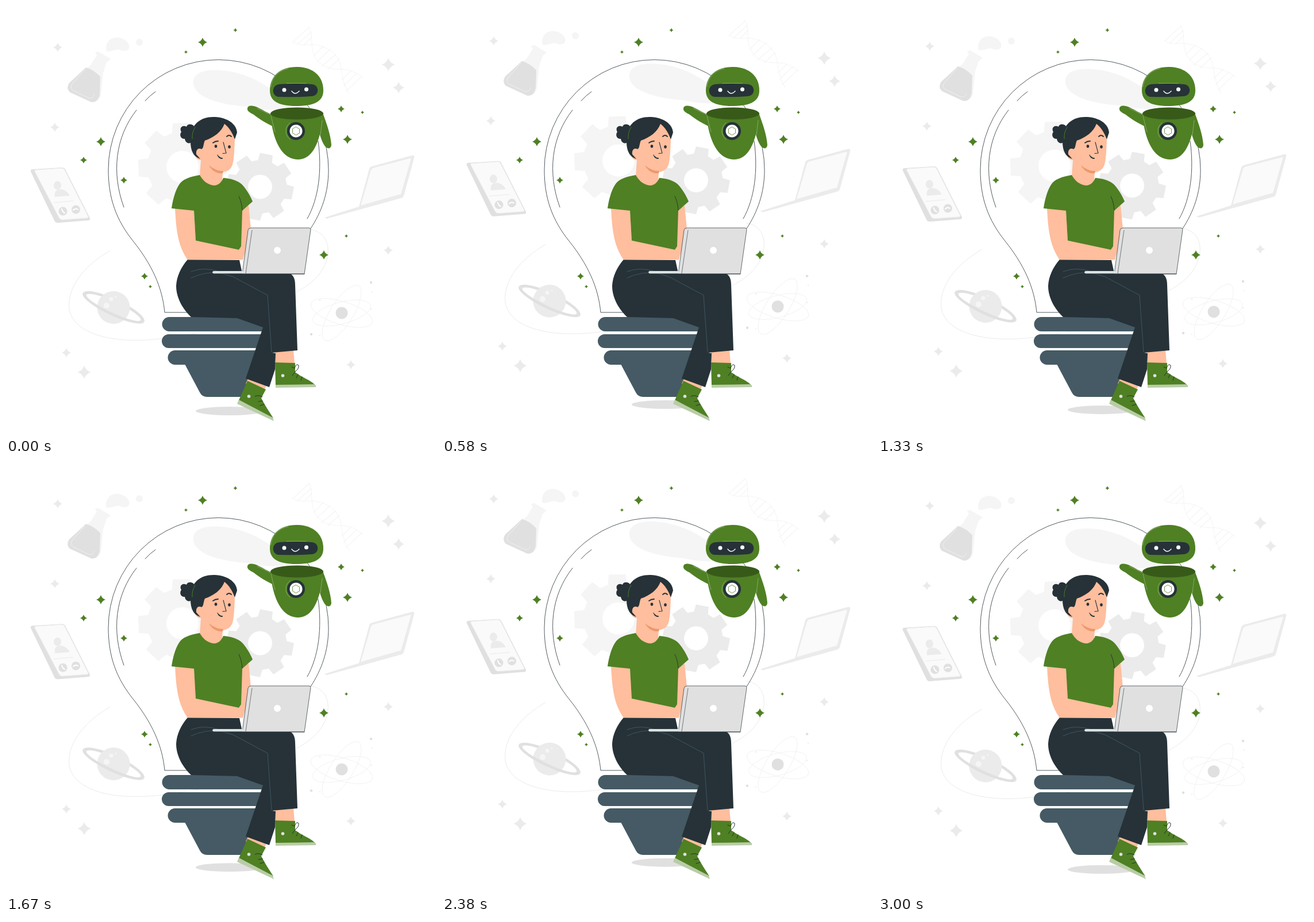
An HTML page for the animation above (3.04 s loop, 748 px wide and 748 px high).

```html
<!DOCTYPE html>
<html lang="en">
<head>
<meta charset="utf-8">
<title>Idea lamp</title>
<style>
html, body { margin: 0; width: 100%; height: 100%; overflow: hidden; background: #fff; }
svg { display: block; width: 100vw; height: 100vh; }
.line { fill: none; stroke-linecap: round; stroke-linejoin: round; }
</style>
</head>
<body>
<svg viewBox="0 0 748 748">
  <g id="drift">
    <g class="line" stroke="#ebebeb">
      <path d="M180 426C135 452 106 490 110 527C117 570 185 590 275 578Q305 573 335 569"/>
      <path d="M529 389C550 391 562 408 560 430C557 460 535 482 506 497"/>
    </g>
    <path fill="#f5f5f5" d="M326 130C329 112 355 109 385 113C425 119 460 140 485 165C500 185 450 183 420 175C385 173 322 162 326 130Z"/>
    <g id="cogs"></g>

    <!-- flask -->
    <path fill="#f5f5f5" d="M155 81L160 79L182 92L175 98L169 116L165 156Q160 169 148 166L111 150Q104 142 110 133L147 103L158 86ZM174 77C173 60 185 53 197 55C208 57 217 66 214 74C210 80 203 78 198 76C190 74 178 83 174 77Z"/>
    <circle cx="232" cy="63" r="6" fill="#f5f5f5"/>
    <path fill="#e0e0e0" d="M139 107Q153 111 164 123L163 154Q159 169 148 167L111 150Q104 143 110 134Z"/>
    <path class="line" stroke="#f0f0f0" d="M137 111L115 136Q111 142 117 147L144 160Q151 162 154 154"/>

    <!-- helix -->
    <g class="line" stroke="#ebebeb" stroke-width=".8">
      <path stroke="#f2f2f2" d="M498 62C513 72 525 65 540 68C565 72 579 88 583 107C585 125 589 141 597 153M527 36C535 50 529 66 535 82C541 100 557 111 583 110C600 110 612 118 621 125"/>
      <path d="M500 62L527 37M508 66L531 45M519 67L532 54M536 86L552 70M541 97L564 75M549 105L574 84M560 110L580 92M584 128L600 113M587 139L610 117M592 148L618 123"/>
    </g>

    <!-- phone -->
    <path fill="#e0e0e0" d="M43 288Q42 284 47 284L97 281Q101 281 103 284L146 369Q147 373 142 373L92 377Q86 378 84 373Z"/>
    <path fill="#fafafa" stroke="#ebebeb" d="M52 285L97 282Q100 282 102 285L143 366Q144 369 140 369L98 372Q94 372 92 368L50 288Q49 285 52 285Z"/>
    <g fill="#ebebeb">
      <ellipse cx="89.500" cy="312" rx="6.500" ry="7.500"/>
      <path d="M85 332C83 321 90 318 98 319Q106 321 111 330Z"/>
    </g>
    <g fill="#e0e0e0"><circle cx="99" cy="357" r="7.500"/><circle cx="121.500" cy="354" r="7.500"/></g>
    <path class="line" stroke="#ebebeb" d="M83 342L117 339"/>
    <path class="line" stroke="#fff" stroke-width="2" d="M97 353Q98 358 102 360M117 355Q121 351 125 354"/>

    <!-- notebook -->
    <path fill="#ebebeb" d="M554 368L614 349L632 283Q633 280 636 279L706 260Q711 259 710 264L692 330Q691 333 688 334L558 370Z"/>
    <path fill="#fafafa" d="M638 282L703 265Q705 265 704 268L687 327L617 347L635 285Z"/>

    <!-- planet -->
    <g transform="translate(187 524.500) rotate(25)" fill="#e0e0e0">
      <path d="M-59 0A59 15 0 0 1 59 0H52A52 10 0 0 0 -52 0Z"/>
      <circle r="28.500" fill="#ebebeb"/>
      <path d="M-59 0A59 14 0 0 0 59 0H52A52 9 0 0 1 -52 0Z"/>
    </g>
    <g fill="#f5f5f5"><circle cx="183" cy="510" r="3.500"/><circle cx="175" cy="521" r="5"/><circle cx="191" cy="506" r="1.500"/></g>

    <!-- atom -->
    <g transform="translate(584 534)" class="line" stroke="#f0f0f0" stroke-width=".8">
      <ellipse rx="56" ry="20" transform="rotate(17)"/>
      <ellipse rx="56" ry="20" transform="rotate(-58)"/>
      <ellipse rx="52" ry="19" transform="rotate(-15)"/>
      <circle r="10.500" fill="#e0e0e0" stroke="none"/>
    </g>
    <g fill="#e0e0e0"><circle cx="635" cy="481" r="2.200"/><circle cx="531" cy="571" r="2.200"/></g>
    <g fill="#ebebeb"><circle cx="546" cy="512" r="1.200"/><circle cx="637" cy="497" r="1"/><circle cx="635" cy="527" r="1.200"/><circle cx="546" cy="573" r="1"/></g>
    <ellipse cx="389" cy="704.500" rx="59" ry="7.500" fill="#e0e0e0"/>
    <g id="pale" fill="#ebebeb"></g>
  </g>

  <!-- bulb -->
  <g class="line" stroke="#263238" stroke-width=".8">
    <path d="M322 533H276C273 500 261 459 222 410C192 373 178 335 178 285A191.500 191.500 0 0 1 561 285C561 325 549 358 530 387"/>
    <path d="M227 181C190 228 183 290 205 350M242 165Q250 156 260 149M543 235C550 285 544 335 524 370"/>
  </g>
  <g fill="#455a64">
    <path d="M284 541H447V566H284A12.500 12.500 0 0 1 284 541ZM283 571H445V595H283A12 12 0 0 1 283 571ZM294 599H440V624H294A12.500 12.500 0 0 1 294 599Z"/>
    <path d="M311 623H432L416 680H350Q341 680 337 672Z"/>
  </g>

  <g id="bright" fill="#4f8024"></g>

  <!-- woman -->
  <path fill="#ffbe9d" d="M468 599L500 598L502 622H469ZM421 648L453 660L448 671L417 657Z"/>
  <path fill="#263238" d="M316 441L406 442L411 465L492 465C500 467 503 475 503 485L507 599L463 603L469 604L468 632L458 663L417 648L447 559L402 543L322 541C305 525 296 505 296 487C297 470 304 455 316 441Z"/>
  <path class="line" stroke="#455a64" stroke-width=".9" d="M322 462Q345 453 371 462M322 473Q345 462 372 464L395 471L455 503L462 602"/>
  <path fill="#ffbe9d" d="M294 350L327 354L330 406L404 422L411 353L422 347L426 388L412 441.500H316C302 421 296 400 294 350Z"/>
  <path fill="#ffbe9d" d="M339 232L380 203C391 208 398 220 398 234C397 252 397 266 394 276C391 285 385 288 377 289L376 305Q368 318 355 314Q342 308 337 295L339 268C330 268 327 259 329 251Q332 244 339 247Z"/>
  <path fill="#eb996e" d="M353 277Q364 287 378 287L377 291C367 292 358 287 353 277Z"/>
  <path fill="#4f8024" d="M337 294C320 297 307 301 301 311C294 322 290 338 288 352L327 356L330 408L405 424L409 418L411 356L429 340C424 328 417 317 410 310C402 303 390 300 378 299C374 309 367 313 360 312C349 310 342 303 337 294Z"/>
  <path class="line" stroke="#263238" stroke-width=".9" d="M405 331Q410 341 411 355"/>
  <g fill="#263238">
    <path d="M321 236C319 205 340 192 363 193C385 194 401 205 402 220L398 232C394 221 388 211 380 205C375 219 361 229 346 234C343 240 344 248 340 249C334 246 330 251 331 258L338 266C325 262 321 250 321 236Z"/>
    <path d="M327 209C323 204 315 205 314 210C306 206 301 213 305 219C301 224 304 232 311 231C312 239 320 241 323 236Z"/>
    <ellipse cx="365" cy="244" rx="2.300" ry="2.800"/><ellipse cx="388.500" cy="245" rx="2.300" ry="2.800"/>
  </g>
  <path class="line" stroke="#263238" stroke-width="1.100" d="M378 237L383 256L377 256.500M368 259Q370 265 376 265"/>
  <path class="line" stroke="#263238" stroke-width="1.800" d="M360 238Q364 235 369 235M384 227Q388 223 392 227M370 262Q372 265 376 265"/>
  <path class="line" stroke="#4f8024" stroke-width=".9" d="M329 211Q323 220 324 231"/>

  <!-- shoes -->
  <path fill="#4f8024" d="M468 620L503 621L503 637C515 646 533 652 539 661L469 660ZM420 652L452 667L444 682C450 694 458 706 465 717L404 688Z"/>
  <path fill="#b9cca7" d="M469 659L535 658Q540 660 539 663L469 664ZM405 685L464 716L466 722L402 692Z"/>
  <g fill="#e0e0e0"><circle cx="481.500" cy="643" r="2.800"/><circle cx="422.500" cy="679" r="2.800"/></g>
  <path class="line" stroke="#263238" d="M498 643L503 636Q510 631 509 625Q505 621 502 630L497 628M505 647L508 641M513 651L515 645M433 679Q440 676 446 680M439 688L446 687M442 695L449 693"/>

  <!-- computer -->
  <path fill="#e0e0e0" stroke="#263238" stroke-width=".7" d="M426 386H527Q530 386 530 389L519 466H411L421 390Q422 386 426 386Z"/>
  <path class="line" stroke="#263238" stroke-width=".6" d="M428 390L417 465"/>
  <path fill="#dbe3e3" d="M361 461H412V465.500H361Q357 463 361 461Z"/>
  <path class="line" stroke="#263238" stroke-width=".8" d="M361 466.200H519"/>
  <circle cx="472" cy="425" r="6" fill="#fff"/>

  <!-- robot -->
  <g fill="#4f8024">
    <path d="M459 147C459 121 478 106 505 106C533 106 552 121 552 147C552 165 538 174 505 174C473 174 459 165 459 147Z"/>
    <path d="M420 178C421 172 430 173 437 176C447 181 457 187 463 189L466 210C452 204 441 197 431 189C423 185 419 182 420 178Z"/>
    <path d="M551 186C558 205 565 225 566 242C565 249 559 249 555 244C550 237 548 230 546 224L548 195Z"/>
    <path d="M460 187C463 230 478 267 508 267C536 267 548 230 552 186Z"/>
  </g>
  <ellipse cx="506" cy="187" rx="46" ry="10.500" fill="#385a19"/>
  <path class="line" stroke="#95b379" stroke-width=".8" d="M461 140C463 123 475 112 491 109M488 134.500H522M461 191Q464 205 468 219M437 178L460 189M547 224L550 199"/>
  <path fill="#263238" d="M476 136Q503 134 531 136C546 136 546 157 531 157Q503 159 476 158C461 158 461 137 476 136Z"/>
  <g fill="#fff"><circle cx="484" cy="146" r="3.500"/><circle cx="522.500" cy="145" r="3.500"/></g>
  <path class="line" stroke="#fff" stroke-width="1.400" d="M497 148Q503 156 510 148"/>
  <circle cx="504.500" cy="217.500" r="15.500" fill="#263238"/>
  <circle cx="504.500" cy="217.500" r="11" fill="#fff"/>
  <path class="line" stroke="#95b379" stroke-width=".8" d="M494 203A18 18 0 0 0 494 232"/>
  <path class="line" stroke="#4f8024" stroke-width=".8" d="M504.500 210.500L510.500 214V221L504.500 224.500L498.500 221V214Z"/>
</svg>
<script>
const el = id => document.getElementById(id);

function star([x, y, r]) {
  const k = r * .25;
  return `<path d="M${x} ${y - r}Q${x + k} ${y - k} ${x + r} ${y}Q${x + k} ${y + k} ${x} ${y + r}` +
    `Q${x - k} ${y + k} ${x - r} ${y}Q${x - k} ${y - k} ${x} ${y - r}Z"/>`;
}

function cog(x, y, r, hole, turn, color) {
  const points = [];
  for (let i = 0; i < 8; i++) {
    for (const [angle, size] of [[-.27, .79], [-.19, 1], [.19, 1], [.27, .79]]) {
      const a = turn + i * Math.PI / 4 + angle;
      points.push([x + r * size * Math.cos(a), y + r * size * Math.sin(a)]);
    }
  }
  return `<polygon points="${points.join(' ')}" fill="${color}"/><circle cx="${x}" cy="${y}" r="${hole}" fill="#fff"/>`;
}

el('cogs').innerHTML = cog(307, 280, 78, 28, -.03, '#f5f5f5') + cog(442, 314.5, 59, 21, .19, '#ebebeb');
el('pale').innerHTML = [[90, 72, 8], [665, 102, 11.5], [683, 142, 10], [85, 211, 8],
  [665, 425, 8], [600, 624, 8], [136, 637, 11.5], [105, 603, 8]].map(star).join('');
el('bright').innerHTML = [[342, 63, 8], [399, 42, 3.5], [313, 80, 3], [583, 179, 6], [620, 185, 3],
  [594, 232, 8], [165, 236, 8], [135, 268, 6], [205, 303, 6], [241, 470, 6], [251, 488, 3],
  [553, 433, 8], [592, 400, 3]].map(star).join('');

// The backdrop bobs at constant speed, twice per loop, in steps of 1/24 s.
const LOOP = 3040, HALF = 760, RISE = 14.7, LEAD = 40;
const start = performance.now();

function draw() {
  const t = (performance.now() - start) % LOOP;
  const tick = Math.floor(t * .024 + .2) / .024;
  const phase = (tick + LEAD) % (2 * HALF) / HALF;
  const lift = RISE * (1 - Math.abs(1 - phase));
  el('drift').setAttribute('transform', `translate(0 ${(RISE * LEAD / HALF - lift).toFixed(2)})`);
  requestAnimationFrame(draw);
}
draw();
</script>
</body>
</html>
```
